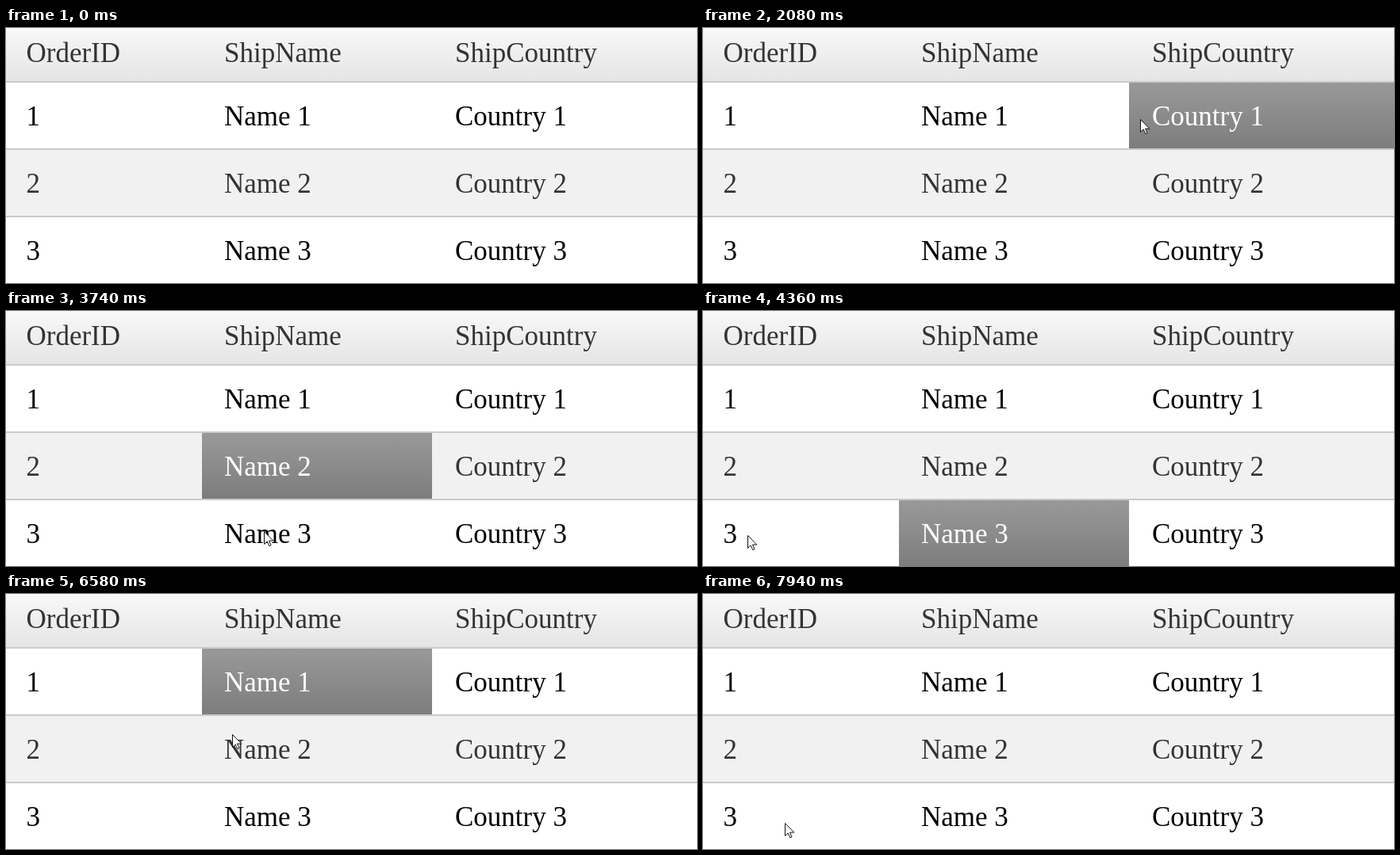
Recreate the animation shown at these times as an HTML page. Size 871 by 322 pixels, loop 8 s.

```html
<!DOCTYPE html>
<html lang="en">
<head>
<meta charset="utf-8">
<title>Order grid</title>
<style>
  html, body { margin: 0; width: 100%; height: 100%; overflow: hidden; background: #fff; }
  svg { display: block; }
  text { font: 35px "Liberation Serif", "Times New Roman", serif; fill: #000; }
  .head, .alt { fill: #333; }
  .on { fill: #fff; }
</style>
</head>
<body>
<svg id="stage" width="871" height="322" viewBox="0 0 871 322">
  <defs>
    <linearGradient id="header" x2="0" y2="1">
      <stop stop-color="#f8f8f8"/><stop offset="1" stop-color="#e5e5e5"/>
    </linearGradient>
    <linearGradient id="selected" x2="0" y2="1">
      <stop stop-color="#999"/><stop offset="1" stop-color="#7d7d7d"/>
    </linearGradient>
  </defs>
  <rect width="871" height="67" fill="url(#header)"/>
  <rect y="154" width="871" height="83" fill="#f1f1f1"/>
  <path d="M0 68H871M0 153H871M0 238H871" stroke="#cacaca" stroke-width="2"/>
  <rect id="highlight" height="83" fill="url(#selected)"/>
  <g id="labels"></g>
  <circle id="ring" r="15" fill="#faf67a"/>
  <path id="cursor" d="M.5 .5V16.5L4.2 13 6.8 18.7 9 17.7 6.5 12.1H11.8Z" fill="#fff" stroke="#111" stroke-width="1"/>
</svg>
<script>
const LOOP = 8000, FRAME = 67, SHOW = 370;
const edges = [0, 247, 537, 871];
const textX = [25.5, 275, 566];
const byId = id => document.getElementById(id);
const highlight = byId('highlight'), ring = byId('ring'), cursor = byId('cursor');

// first step, last step, x, y, easing
const linear = p => p;
const easeOut = p => p * (2 - p);
const smooth = p => p * p * (3 - 2 * p);
const moves = [
  [370, 580, 641, 281, easeOut],
  [1060, 1270, 598, 198, smooth],
  [1540, 1820, 572, 118, smooth],
  [2020, 2080, 551, 115, linear],
  [2150, 2290, 432, 116, linear],
  [2360, 2500, 345, 119, easeOut],
  [2780, 3050, 329, 175, smooth],
  [3400, 3680, 325, 278, smooth],
  [3890, 4360, 56, 283, smooth],
  [4420, 4420, 52, 283, linear],
  [4820, 5030, 50, 201, smooth],
  [5240, 5510, 45, 109, smooth],
  [5780, 6130, 278, 117, smooth],
  [6380, 6580, 285, 177, smooth],
  [6850, 7110, 282, 284, smooth],
  [7460, 7740, 106, 294, smooth],
  [7940, 7940, 103, 289, linear]
];

// press, release, row, column; the first column cannot be selected
const clicks = [
  [720, 790, 3, 2], [1330, 1400, 2, 2], [1890, 1960, 1, 2],
  [2570, 2640, 1, 1], [3120, 3190, 2, 1], [3750, 3820, 3, 1],
  [4420, 4490, 3, 0], [5100, 5170, 2, 0], [5580, 5640, 1, 0],
  [6200, 6270, 1, 1], [6650, 6710, 2, 1], [7180, 7240, 3, 1],
  [7810, 7880, 3, 0]
];

function addLabel(row, col, text) {
  const el = document.createElementNS('http://www.w3.org/2000/svg', 'text');
  el.setAttribute('x', textX[col]);
  el.setAttribute('y', row ? 38 + 85 * row : 43);
  el.setAttribute('class', row === 0 ? 'head' : row === 2 ? 'alt' : '');
  el.textContent = text;
  byId('labels').append(el);
  return el;
}

const cells = [['OrderID', 'ShipName', 'ShipCountry']];
for (let row = 1; row <= 3; row++) cells.push([row, `Name ${row}`, `Country ${row}`]);
const labels = cells.map((line, row) => line.map((text, col) => addLabel(row, col, text)));

function cursorAt(t) {
  let x = 678, y = 309;
  for (const [start, end, toX, toY, ease] of moves) {
    if (t < start) break;
    const gaps = Math.round((end - start) / FRAME);
    const step = gaps ? Math.floor((t - start) / (end - start) * gaps + 1e-6) : 0;
    const p = ease(Math.min(1, (step + 1) / (gaps + 1)));
    x += (toX - x) * p;
    y += (toY - y) * p;
  }
  return [Math.round(x), Math.round(y)];
}

function show(el, visible) {
  el.setAttribute('visibility', visible ? 'visible' : 'hidden');
}

let lit = null;
function render(t) {
  const [x, y] = cursorAt(t);
  show(cursor, t >= SHOW);
  cursor.setAttribute('transform', `translate(${x} ${y})`);

  const click = clicks.filter(c => t >= c[0]).pop();
  const pressed = Boolean(click) && t < click[1];
  show(ring, pressed);
  ring.setAttribute('cx', x);
  ring.setAttribute('cy', y);

  if (lit) lit.classList.remove('on');
  lit = null;
  const active = Boolean(click) && !pressed && click[3] > 0;
  show(highlight, active);
  if (active) {
    const [, , row, col] = click;
    highlight.setAttribute('x', edges[col]);
    highlight.setAttribute('y', 85 * row - 16);
    highlight.setAttribute('width', edges[col + 1] - edges[col]);
    lit = labels[row][col];
    lit.classList.add('on');
  }
}

const origin = performance.now();
function tick() {
  render((performance.now() - origin) % LOOP);
  requestAnimationFrame(tick);
}
tick();
</script>
</body>
</html>
```
